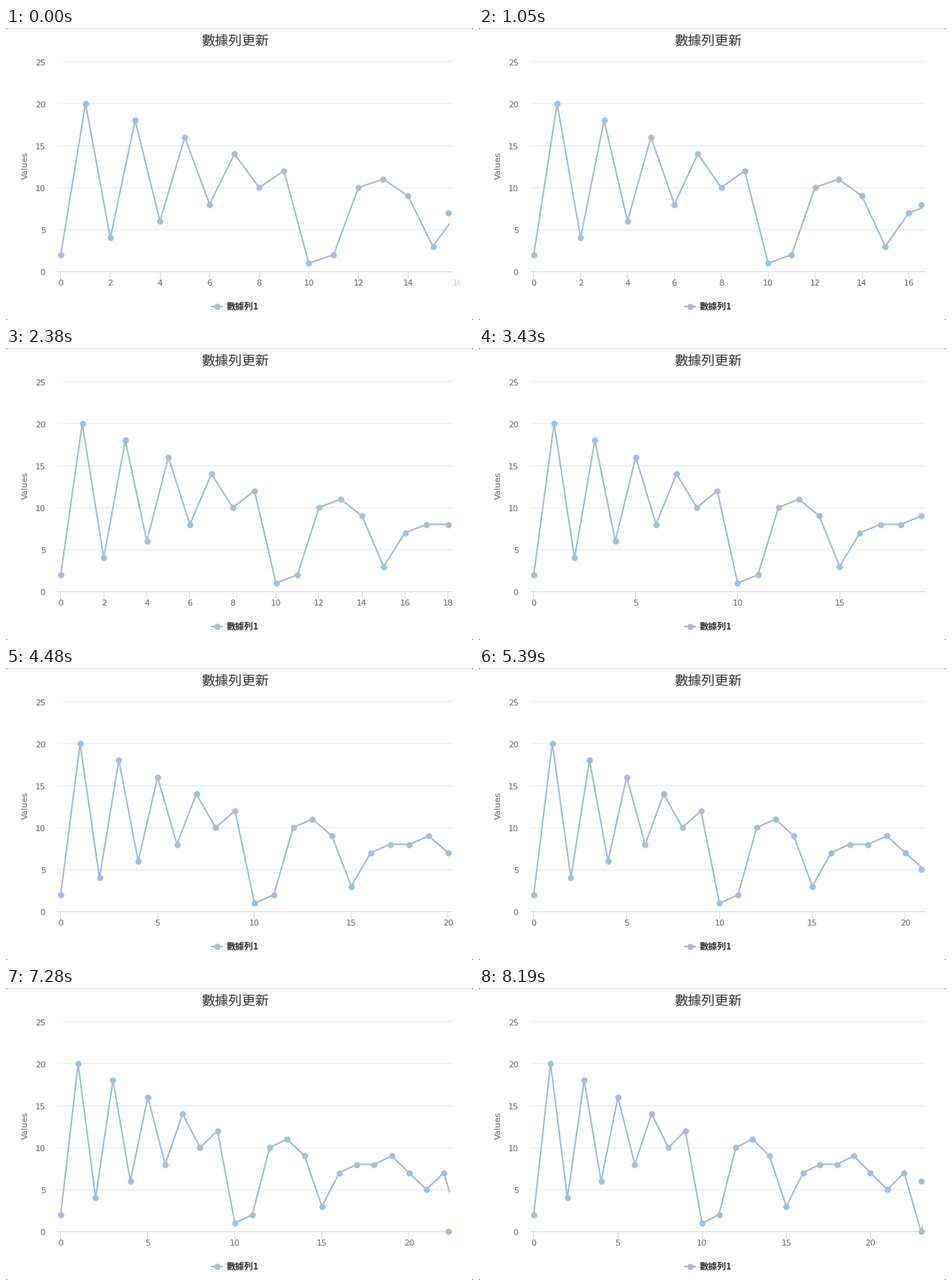
A matplotlib script for the animation above (8.26 s loop, 622 px wide and 390 px high).

```python
import math

import matplotlib.pyplot as plt
from matplotlib.animation import FuncAnimation
from matplotlib.patches import FancyBboxPatch, Rectangle

W, H, DPI = 622, 390, 100
FRAMES, INTERVAL = 118, 70
PT = 72 / DPI  # points per pixel

VALUES = [2, 20, 4, 18, 6, 16, 8, 14, 10, 12, 1, 2, 10, 11, 9, 3,
          7, 8, 8, 9, 7, 5, 7, 0, 6]
FIRST_NEW = 16
X0, SPAN = 72.9, 516
AXIS_Y = 325.5
EASE_FRAMES = 7.5
# A new value arrives about every 15 frames; its glide starts slightly later.
STARTS = [-4.39] + [11.05 + 15.07 * k for k in range(8)]
LAG = 0.48

LINE, DOT = "#a0bace", "#9dc1e4"
GRID, AXIS, LABEL = "#e9e9e9", "#d6dadf", "#666666"
CJK = "Noto Sans CJK JP"

fig = plt.figure(figsize=(W / DPI, H / DPI), dpi=DPI, facecolor="#777777")
ax = fig.add_axes([0, 0, 1, 1])
ax.set_xlim(0, W)
ax.set_ylim(H, 0)
ax.axis("off")


def stroke(xs, ys, color, width=1.0, **kw):
    return ax.plot(xs, ys, color=color, lw=width * PT, snap=False, **kw)[0]


def dots(xs, ys):
    return ax.plot(xs, ys, "o", color=DOT, ms=8.3 * PT, mew=0, zorder=5,
                   clip_on=False, snap=False)[0]


def label(x, y, text, size=11, color=LABEL, family="DejaVu Sans", **kw):
    return ax.text(x, y, text, fontsize=size * PT, color=color,
                   family=family, **kw)


def value_y(v):
    return 325.3 - 11.22 * v


def tick_values(last):
    return range(0, last + 1, 2 if last < 19 else 5)


# Window and fixed chart parts
ax.add_patch(FancyBboxPatch((0, 0.2), W, H - 0.2, lw=0, fc="white", zorder=0,
                            boxstyle="round,pad=0,rounding_size=3",
                            snap=False))
for v in range(0, 26, 5):
    y = math.floor(value_y(v)) + 0.5
    stroke([68, 595], [y, y], GRID if v else AXIS, zorder=1,
           solid_capstyle="butt")
    label(52.6, value_y(v) + 5, str(v), ha="right")
label(26.4, 183.8, "Values", 11.3, rotation=90, ha="center", va="center")
label(304.8, 22.2, "數據列更新", 18, "#333333", CJK, ha="center")
stroke([273, 289], [372, 372], LINE, 2, solid_capstyle="butt")
dots([281], [372])
label(294, 376.3, "數據列1", 12, "#333333", CJK, weight="bold")

# Moving parts
clip = Rectangle((60, 30), 530.5, 310, transform=ax.transData)
curve = stroke([], [], LINE, 2, zorder=4, solid_joinstyle="round",
               solid_capstyle="round")
curve.set_clip_path(clip)
markers = dots([], [])
all_ticks = sorted({v for n in range(15, 25) for v in tick_values(n)})
ticks = {v: (stroke([], [], AXIS, zorder=1, solid_capstyle="butt"),
             label(0, 344, str(v), ha="center")) for v in all_ticks}
# The chart ends here, so labels gliding in are cut off.
ax.add_patch(Rectangle((605, 300), 15, 60, fc="white", lw=0, zorder=9))


def tick_alpha(v, last, t):
    before, after = v in tick_values(last - 1), v in tick_values(last)
    if before and after:
        return 1
    if after:
        return t ** 2.5
    return 1 - t if before else 0


def update(frame):
    step = max(i for i, s in enumerate(STARTS) if frame >= s - LAG)
    last = FIRST_NEW + step
    p = min(max((frame - STARTS[step]) / EASE_FRAMES, 0), 1)
    t = 0.5 - 0.5 * math.cos(math.pi * p)
    gap = SPAN * ((1 - t) / (last - 1) + t / last)

    xs = [X0 + i * gap for i in range(last + 1)]
    ys = [value_y(v) for v in VALUES[:last + 1]]
    curve.set_data(xs, ys)
    # The newest marker waits at the right end while the rest close up.
    markers.set_data(xs[:-1] + [X0 + SPAN], ys)

    for v, (mark, text) in ticks.items():
        x, alpha = X0 + v * gap, tick_alpha(v, last, t)
        snapped = math.floor(x) + 0.5
        mark.set_data([snapped, snapped], [AXIS_Y, AXIS_Y + 9.5])
        text.set_x(x)
        for part in (mark, text):
            part.set_alpha(alpha)
            part.set_visible(alpha > 0 and x < 620)
    return []


anim = FuncAnimation(fig, update, frames=FRAMES, interval=INTERVAL,
                     repeat=True, repeat_delay=0, blit=False)
plt.show()
```
